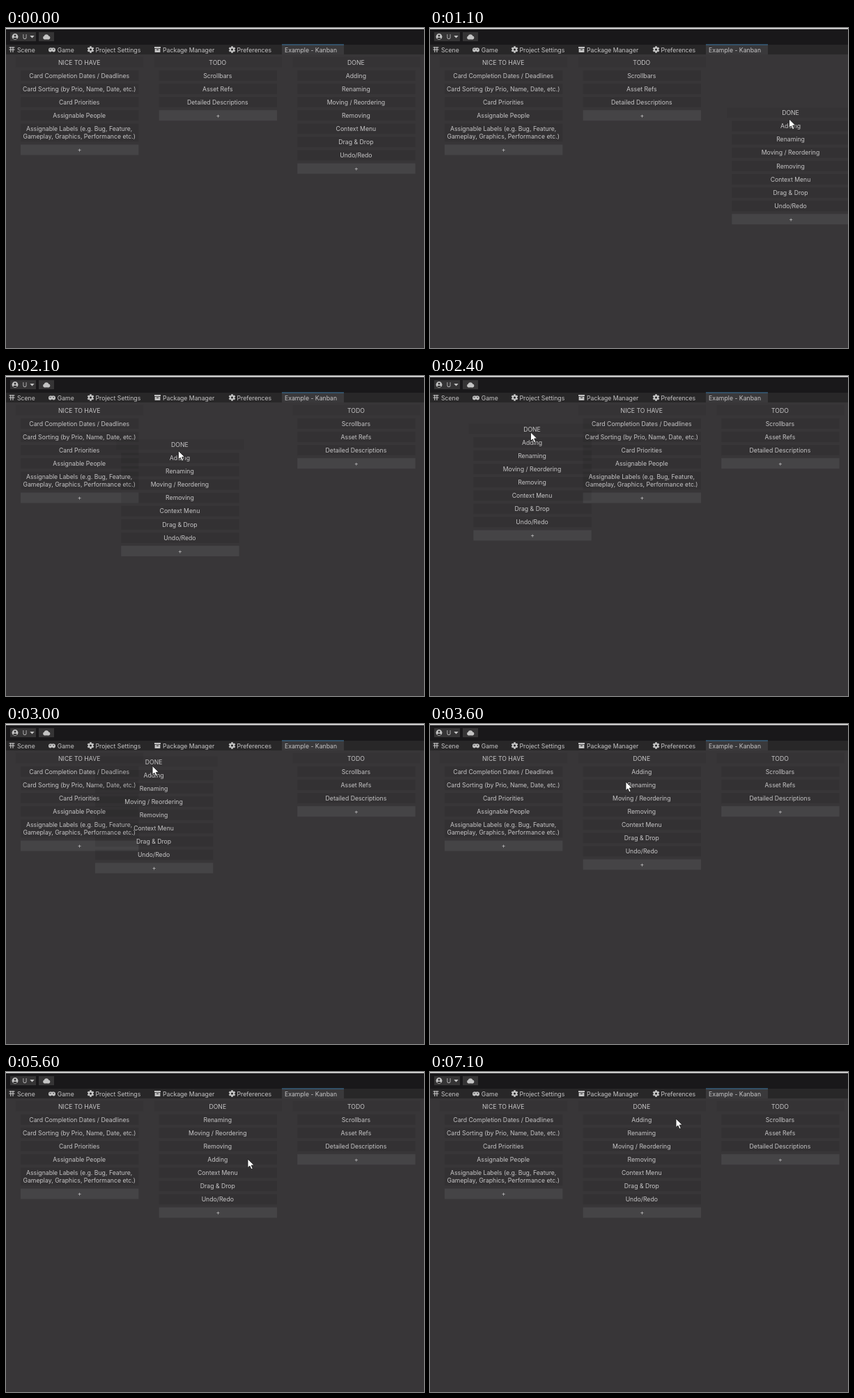
Recreate the animation shown at these times as an HTML page with a canvas. Size 600 by 460 pixels, loop 7.2 s.

```html
<!DOCTYPE html>
<html lang="en">
<head>
<meta charset="utf-8">
<title>Kanban board</title>
<style>
html, body { margin: 0; width: 600px; height: 460px; overflow: hidden; background: #383638; }
canvas { display: block; }
</style>
</head>
<body>
<canvas id="stage" width="600" height="460"></canvas>
<script>
const ctx = document.getElementById('stage').getContext('2d');
const LOOP = 7200, STEP = 100;
const COL0 = 105.7, COL_GAP = 198.6, ROW0 = 68.4, ROW_GAP = 19.1, CARD_W = 169.4, CARD_H = 15;
const TEXT = '#c6c5c6', ICON = '#c4c4c4', STRIP = '#282728', BUTTON = '#353435';

const columns = {
  nice: ['NICE TO HAVE', 'Card Completion Dates / Deadlines', 'Card Sorting (by Prio, Name, Date, etc.)',
    'Card Priorities', 'Assignable People',
    'Assignable Labels (e.g. Bug, Feature,\nGameplay, Graphics, Performance etc.)'],
  todo: ['TODO', 'Scrollbars', 'Asset Refs', 'Detailed Descriptions'],
  done: ['DONE', 'Adding', 'Renaming', 'Moving / Reordering', 'Removing', 'Context Menu', 'Drag & Drop', 'Undo/Redo']
};

const colX = i => COL0 + i * COL_GAP;
const clamp = u => Math.min(1, Math.max(0, u));
const part = (t, from, to) => clamp((t - from) / (to - from));
const ease = (t, from, to) => (1 - Math.cos(Math.PI * part(t, from, to))) / 2;
const bump = (t, from, to) => Math.sin(Math.PI * part(t, from, to));

// Smooth curve through a few [time, x, y] points
function glide(points, t) {
  const last = points.length - 1;
  const next = points.findIndex(p => p[0] > t);
  if (next === 0) return points[0].slice(1);
  if (next < 0) return points[last].slice(1);
  const a = points[next - 1], b = points[next];
  const span = b[0] - a[0], u = (t - a[0]) / span;
  const slope = (i, k) => i === 0 || i === last ? 0
    : (points[i + 1][k] - points[i - 1][k]) / (points[i + 1][0] - points[i - 1][0]) * span;
  return [1, 2].map(k => a[k] + (b[k] - a[k]) * u * u * (3 - 2 * u)
    + slope(next - 1, k) * u * (1 - u) ** 2 - slope(next, k) * u * u * (1 - u));
}

const columnAt = t => glide([
  [700, colX(2), 0], [1100, 518, 72.7], [1250, 505, 100], [1600, 314, 51], [1750, 300, 12],
  [1900, 298, 12], [2150, 235, 54], [2400, 147, 27], [2650, 109, 14], [3400, colX(1), 0]
], t);

function cardAt(t) {
  const rows = 3 * (ease(t, 4200, 4800) - ease(t, 5700, 6200));
  const swing = bump(t, 5900, 6300);
  return [colX(1) - 6 * swing, ROW0 + rows * ROW_GAP - 26 * swing];
}

const freePointerAt = t => glide([
  [200, 600, 150], [600, 501, 55], [3400, 300, 58], [3600, 281, 83], [4000, 302, 68], [5400, 308, 126],
  [5600, 347, 125], [6600, 347, 68], [6900, 408, 143], [7100, 353, 67]
], t);

const holds = [
  { from: 700, to: 3400, path: columnAt, x: -2.5, y: 55.5 },
  { from: 4200, to: 5400, path: cardAt, x: -2, y: -.5 },
  { from: 5600, to: 6600, path: cardAt, x: 42.7, y: -.7 }
];

// A held item lags a little behind the pointer
function pointerAt(t) {
  const hold = holds.find(h => t >= h.from && t < h.to);
  if (!hold) return freePointerAt(t);
  const [x, y] = hold.path(t);
  const lead = (y - hold.path(t - STEP)[1]) / 8;
  return [x + hold.x, y + hold.y + lead];
}

function rect(color, x, y, w, h) {
  ctx.fillStyle = color;
  ctx.fillRect(x, y, w, h);
}

function box(color, x, y, w = CARD_W, h = CARD_H) {
  rect(color, x - w / 2, y - CARD_H / 2, w, h);
}

function text(str, x, y, align = 'center') {
  ctx.fillStyle = TEXT;
  ctx.textAlign = align;
  ctx.fillText(str, x, y + 3.1);
}

function poly(color, ...points) {
  ctx.fillStyle = color;
  ctx.beginPath();
  points.forEach(p => ctx.lineTo(...p));
  ctx.closePath();
  ctx.fill();
}

function disc(color, x, y, rx, ry = rx) {
  ctx.fillStyle = color;
  ctx.beginPath();
  ctx.ellipse(x, y, rx, ry, 0, 0, 7);
  ctx.fill();
}

function gear(x, y) {
  for (let i = 0; i < 6; i++) {
    ctx.save();
    ctx.translate(x, y);
    ctx.rotate(i * Math.PI / 3);
    rect(ICON, -1.3, -4.8, 2.6, 3);
    ctx.restore();
  }
  disc(ICON, x, y, 3.6);
  disc(STRIP, x, y, 1.5);
}

function toolbar() {
  rect('#19181a', 0, 0, 600, 24);
  rect('#e6e6e6', 0, 0, 600, 1.6);
  rect(BUTTON, 6, 6, 37, 13);
  rect(BUTTON, 47, 6, 22, 13);
  disc(ICON, 13, 12.5, 4.4);
  disc(BUTTON, 13, 11, 1.5);
  disc(BUTTON, 13, 15, 2.7, 1.3);
  text('U', 27, 12.8);
  poly(ICON, [34.3, 11], [40.7, 11], [37.5, 14.6]);
  disc(ICON, 55.5, 14, 2.4);
  disc(ICON, 58, 12.4, 3.2);
  disc(ICON, 61, 14, 2.4);
  rect(ICON, 55.5, 13.5, 5.5, 2.9);
}

function tabs() {
  rect(STRIP, 0, 24, 600, 14);
  rect('#3a393b', 396, 23.5, 89, 14.5);
  rect('#34709c', 396, 23.5, 89, 1);
  for (const d of [6.2, 9.4]) {
    rect(ICON, d, 27, 1.1, 8);
    rect(ICON, 4.5, d + 21.2, 8, 1.1);
  }
  disc(ICON, 63.6, 31.6, 2.6, 3);
  disc(ICON, 68.4, 31.6, 2.6, 3);
  rect(ICON, 63.5, 28.6, 5, 4);
  rect(STRIP, 62.4, 30.4, 2.4, .8);
  disc(STRIP, 68.2, 30.8, .8);
  gear(121.5, 31);
  rect(ICON, 213, 27, 9, 2);
  rect(ICON, 213.6, 29.7, 7.8, 5.3);
  rect(STRIP, 216, 30.8, 3, 1);
  gear(324.5, 31);
  const names = { Scene: 16, Game: 73.7, 'Project Settings': 128.5, 'Package Manager': 225, Preferences: 331.5, 'Example - Kanban': 400 };
  for (const name in names) text(name, names[name], 31.7, 'left');
}

function card(str, x, y) {
  const lines = str.split('\n');
  const extra = (lines.length - 1) * 11.2;
  box('rgba(0,0,0,.09)', x, y, CARD_W, CARD_H + extra);
  lines.forEach((line, i) => text(line, x - .5, y + i * 11.2));
  return extra;
}

function column([title, ...cards], x, dy, held) {
  box('rgba(0,0,0,.05)', x, dy + 49, 183);
  text(title, x - .5, dy + 49.4);
  let y = ROW0 + dy;
  for (const str of cards) {
    if (str !== held) y += card(str, x, y);
    y += ROW_GAP;
  }
  box('#454446', x, y);
  text('+', x, y);
}

function pointer(x, y) {
  ctx.save();
  ctx.translate(x, y);
  ctx.strokeStyle = '#222';
  ctx.lineWidth = .9;
  poly('#fff', [0, 0], [0, 12.6], [2.9, 10], [5, 14.8], [7.2, 13.8], [5.2, 9.2], [9.2, 9]);
  ctx.stroke();
  ctx.restore();
}

function board(t) {
  const [x, dy] = columnAt(t);
  const slot = Math.round((x - COL0) / COL_GAP);
  const others = [0, 1, 2].filter(i => i !== slot);
  column(columns.nice, colX(others[0]), 0);
  column(columns.todo, colX(others[1]), 0);

  const [title, moved, ...rest] = columns.done;
  const [cx, cy] = cardAt(t);
  rest.splice(Math.max(0, Math.round((cy - ROW0) / ROW_GAP)), 0, moved);
  const cardHeld = t >= 4200 && t < 6500;
  column([title, ...rest], x, dy, cardHeld && moved);
  if (cardHeld) card(moved, cx, cy);
}

function frame(now) {
  const t = Math.floor(now % LOOP / STEP) * STEP;
  ctx.font = '8.7px Inter, sans-serif';
  rect('#383638', 0, 0, 600, 460);
  toolbar();
  tabs();
  board(t);
  if (t >= 200) pointer(...pointerAt(t));
  requestAnimationFrame(frame);
}
requestAnimationFrame(frame);
</script>
</body>
</html>
```
